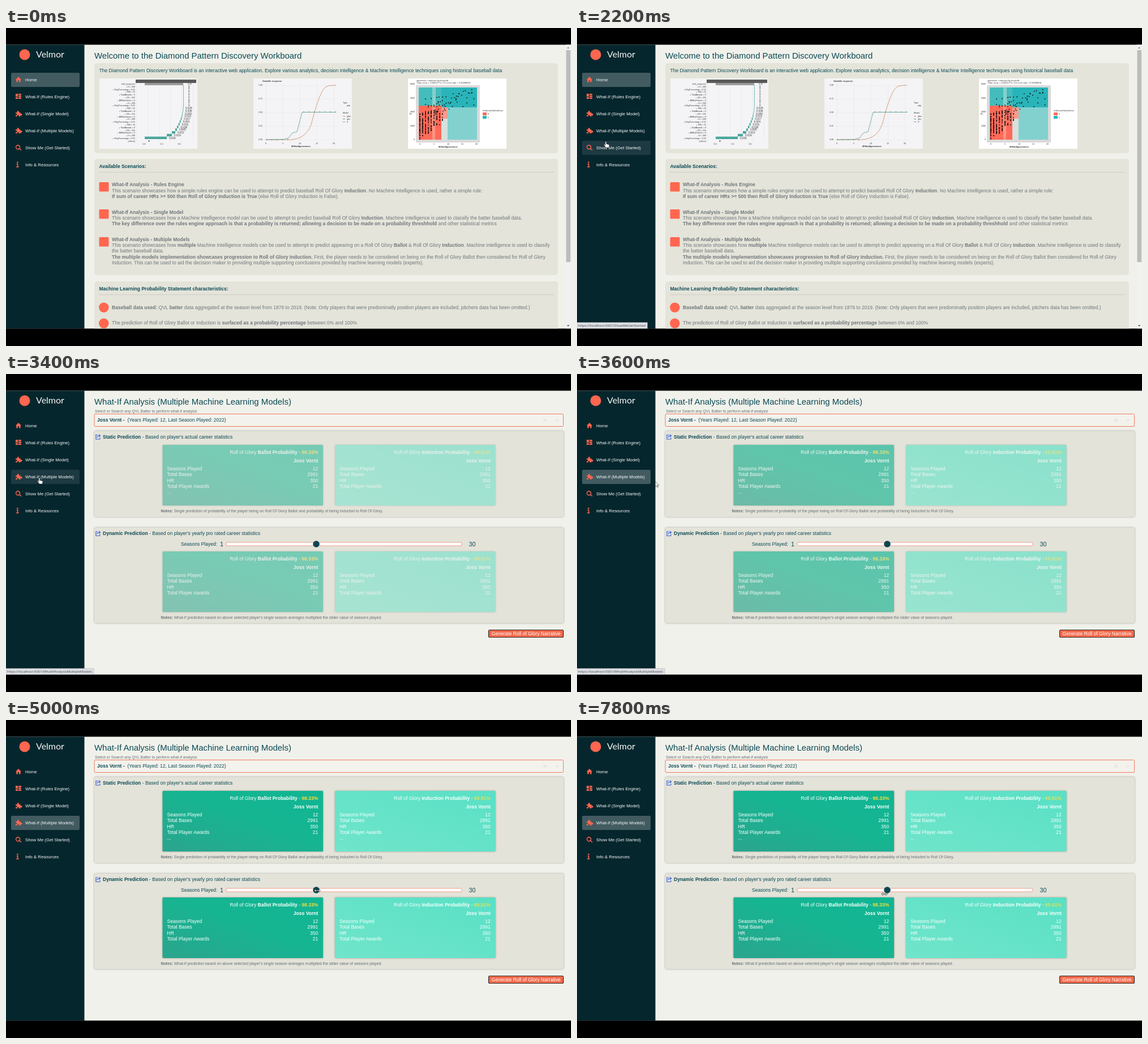
Recreate the animation shown at these times as an HTML page. Size 998 px wide and 561 px high, loop 8 s.

```html
<!DOCTYPE html>
<html lang="en">
<head>
<meta charset="utf-8">
<title>What-If Workboard</title>
<style>
  html, body { margin: 0; width: 100%; height: 100%; overflow: hidden; background: #000; }
  svg { display: block; width: 998px; height: 561px; font-family: "Liberation Sans", Arial, sans-serif; }
  text { white-space: pre; }
  .panel { filter: drop-shadow(0 0 1.5px #0005); }
</style>
</head>
<body>
<svg viewBox="0 0 998 561">
  <defs>
    <linearGradient id="strong" x1="0" y1="1" x2="1" y2="0">
      <stop offset="0" stop-color="#2ba58d"/><stop offset=".55" stop-color="#16b592"/><stop offset="1" stop-color="#10b592"/>
    </linearGradient>
    <linearGradient id="weak" x1="0" y1="1" x2="1" y2="0">
      <stop offset="0" stop-color="#70e5cb"/><stop offset="1" stop-color="#59e0c5"/>
    </linearGradient>
  </defs>
  <g id="stage"></g>
</svg>
<script>
const LOOP = 8000, STEP = 200;
const TOP = 29.5, BOTTOM = 530.5;
const ORANGE = '#ff6650', TEAL = '#0b4a55', GREY = '#70767a';
const PLAYER = 'Joss Vornt', HONOUR = 'Roll of Glory', HONOUR_CAP = 'Roll Of Glory';
const APP = 'Diamond Pattern Discovery Workboard';

// Drawing helpers; *stars* mark bold text
const text = (x, y, s, { size = 8.54, fill = TEAL, anchor = 'start', more = '' } = {}) =>
  `<text x="${x}" y="${y}" font-size="${size}" fill="${fill}" text-anchor="${anchor}" ${more}>${
    s.replace(/\*(.+?)\*/g, '<tspan font-weight="700">$1</tspan>')}</text>`;
const rect = (x, y, w, h, fill, more = '') =>
  `<rect x="${x}" y="${y}" width="${w}" height="${h}" fill="${fill}" ${more}/>`;
const circle = (x, y, r, fill) => `<circle cx="${x}" cy="${y}" r="${r}" fill="${fill}"/>`;
const path = (d, stroke, width = 1, fill = 'none') =>
  `<path d="${d}" stroke="${stroke}" stroke-width="${width}" fill="${fill}"/>`;
const at = (x, y, s) => `<g transform="translate(${x} ${y})">${s}</g>`;
const range = (n, f) => Array.from({ length: n }, (_, i) => f(i)).join('');

// Linear interpolation through [time, ...values] keys
function track(keys, t) {
  const i = keys.findIndex(k => k[0] > t);
  if (i < 0) return keys[keys.length - 1].slice(1);
  if (i === 0) return keys[0].slice(1);
  const a = keys[i - 1], b = keys[i], u = (t - a[0]) / (b[0] - a[0]);
  return a.slice(1).map((v, j) => v + (b[j + 1] - v) * u);
}

const POINTER = [
  [600, 44, 86], [1800, 51, 200], [2200, 51, 200], [2600, 59, 183], [3400, 59, 183],
  [4000, 297, 203], [5000, 550, 301], [5200, 550, 301], [6000, 580, 303],
  [6800, 582, 303], [7600, 557, 306], [7800, 543, 307]
];
const CARD_FADE = [[3000, .04], [3400, .52], [4000, .9], [4600, 1]];

// Sidebar
const PUZZLE = path('M0 3h3a1.7 1.7 0 1 1 2.6 0h3v2.6a1.7 1.7 0 1 1 0 2.2V10H5.5a1.5 1.5 0 1 0-2.4 0H0V7.6a1.5 1.5 0 1 0 0-2.4z', 'none', 0, ORANGE);
const MENU = [
  ['Home', '', path('M0 5L5 0l5 5H8.7v4.5H6.2V6.3H3.8v3.2H1.3V5z', 'none', 0, ORANGE)],
  ['What-If (Rules Engine)', 'WhatIfAnalysisRulesEngine',
    rect(0, 0, 4, 5, ORANGE) + rect(0, 6, 4, 3, ORANGE) + [0, 3.3, 6.6].map(y => rect(5, y, 5, 2.4, ORANGE)).join('')],
  ['What-If (Single Model)', 'WhatIfAnalysisSingleModel', PUZZLE],
  ['What-If (Multiple Models)', 'WhatIfAnalysisMultipleModels', PUZZLE],
  ['Show Me (Get Started)', 'ShowMeGetStarted', path('M7.6 4.2a3.5 3.5 0 1 1-7 0a3.5 3.5 0 1 1 7 0M6.7 6.6L10 9.8', ORANGE, 1.4)],
  ['Info &amp; Resources', 'InfoResources', circle(3.4, 1, 1.3, ORANGE) + path('M1.6 4h2v5M1 9h4.6', ORANGE, 1.6)]
];
const menuY = i => 91 + 30 * i;

function sidebar(active, hover) {
  return rect(0, TOP, 138.5, BOTTOM - TOP, '#06262d') + circle(33, 47, 9.5, ORANGE) +
    text(53, 52.3, 'Velmor', { size: 16, fill: '#f4f6f6', more: 'font-family="Lato, sans-serif"' }) +
    MENU.map(([label, , icon], i) => {
      const y = menuY(i);
      const back = i === hover ? '#1d3941' : i === active ? '#425b61' : '';
      return (back && rect(9, y - 12, 121, 25, back, 'rx="2"')) + at(17, y - 5, icon) +
        text(34, y + 3, label, { size: 7.73, fill: '#f6f8f8' });
    }).join('');
}

function status(item) {
  const url = 'https://localhost:5001/' + MENU[item][1];
  return rect(0, 519.5, 24 + url.length * 2.57, 11, '#dcdee2', 'stroke="#a9adb1" stroke-width=".5"') +
    text(2, 527.3, url, { size: 6.1, fill: '#454a50', more: 'font-family="Open Sans, sans-serif"' });
}

// Home page thumbnails
const tiny = (x, y, s, anchor = 'start', size = 3.6) => text(x, y, s, { size, fill: '#333', anchor });

function waterfall() {
  const labels = ['AllStarGames = 0', 'H = 200', 'SlugPercentage = 0.31', 'RBI = 55', 'TotalAwards = 0', 'GS = 101'];
  const edge = i => i < 9 ? 313 : i < 18 ? 313 - 14 * ((i - 8) / 9) ** 2 : [293, 284, 245][i - 18];
  return rect(165, 89, 173, 124, '#f4f4f6') + range(6, i => rect(230 + i * 20, 97, .4, 104, '#ddd')) +
    rect(229, 91, 107, 6, '#595959') + rect(245, 97, 68, 4, '#9b9b9b') +
    tiny(228, 100, 'total_prognosis', 'end') + tiny(328, 100, '0.50', 'end') +
    range(20, k => {
      const i = k + 1, y = 98 + i * 4.8, x = edge(i), end = edge(i - 1);
      const value = i < 9 ? '0' : '0.0' + (6 + i * 7 % 40);
      return tiny(228, y + 2, '+ ' + labels[i % 6], 'end') + rect(x, y - 2.4, Math.max(end - x, .8), 4.4, '#4ba69b') +
        tiny(i < 9 ? 322 : end + 4, y + 1.7, value, 'start', 4.6);
    }) +
    tiny(228, 201, '(others)', 'end') + circle(252.5, 199.5, 1, '#111') +
    ['0.0', '0.3', '0.6'].map((s, i) => tiny(244 + i * 31, 206, s, 'middle')).join('');
}

function responseChart() {
  return rect(437, 89, 174, 124, '#f4f3f5') + tiny(453, 94.5, '*Variable response*', 'start', 4) +
    range(5, i => rect(455, 101 + i * 24, 132, .5, '#e4e4e6') + rect(459 + i * 30, 97, .5, 104, '#e4e4e6') +
      tiny(453, 102 + i * 24, (1 - i / 4).toFixed(2), 'end') + tiny(459 + i * 30, 205, i * 5 + '', 'middle')) +
    path('M459 197H500C520 197 534 187 540 167C547 139 556 110 565 104Q569 101 583 101', '#c87a45', .7) +
    path('M459 197L490 196.5L499 194L506 185L514 183L523 149L529 148.5H583', '#3d9489', .7) +
    range(14, i => circle(460 + i * 9.4, i < 5 ? 197 : 148, i < 5 || i > 6 ? .8 : 0, '#3d8278')) +
    tiny(521, 210, '*AllStarAppearances*', 'middle') +
    tiny(595, 133, 'Type') + tiny(602, 138, 'pdp') + tiny(595, 151, 'Model') +
    ['#c87a45', '#3d9489', '#8b78b5'].map((c, i) => rect(595, 155 + i * 5, 4, .8, c) + tiny(602, 157 + i * 5, ['gbm', 'glm', 'rf'][i])).join('');
}

function scatter() {
  let seed = 7;
  const rnd = () => (seed = seed * 16807 % 2147483647) / 2147483647;
  const dot = (x, y) => circle(x.toFixed(1), y.toFixed(1), .95, '#111');
  return rect(710, 89, 174, 124, '#fff') +
    tiny(725, 94, 'agreement = induction by threshold') + tiny(725, 98, 'Train error = 0.0221771; CV error rate = 0.0186454', 'start', 4.2) +
    rect(724, 101, 113, 101, '#dadada') + rect(729, 105, 40, 32, '#44bcbc') + rect(753, 105, 6, 32, '#85d0cb') +
    rect(769, 105, 63, 35, '#29b4b9') + rect(729, 137, 40, 60, '#ff6a58') + rect(753, 137, 5, 60, '#ff9482') +
    rect(769, 140, 11, 20, '#ff9a8c') + rect(769, 160, 11, 37, '#d6e0dd') + rect(780, 140, 52, 57, '#82d1cf') +
    range(9, k => range(38 - 4 * k, () => dot(731 + k * 5, 196 - k * 3.5 - rnd() * (48 - 3 * k)))) +
    range(10, i => dot(741 + i % 5 * 5, 124 + rnd() * 16)) +
    range(52, () => { const u = rnd() ** 1.5; return dot(757 + u * 70, 152 - u * 14 - rnd() * 31); }) +
    range(5, i => tiny(722, 198 - i * 24.5, i * 2000 + '', 'end') + tiny(731 + i * 25, 206, i * 5 + '', 'middle')) +
    tiny(781, 210.5, '*AllStarAppearances*', 'middle') + tiny(712, 153, 'TB') +
    tiny(842, 147, 'inducted:false/true', 'start', 4.4) +
    rect(842, 149, 7, 5, '#ff6a58') + rect(842, 155, 7, 5, '#29b4b9') + tiny(851, 153, '0') + tiny(851, 159, '1');
}

// Home page
const block = (x, y, lines) => lines.map(([dy, s]) => text(x, y + dy, s, { fill: GREY })).join('');

const HOME = (() => {
  const ml = 'Machine Intelligence';
  const section = (y, h, title) => rect(156, y, 819, h, '#e4e4da', 'rx="5"') +
    text(164.5, y + 16, `*${title}*`) + rect(164, y + 23, 804, .8, '#c9cac3');
  return text(156, 54, `Welcome to the ${APP}`, { size: 14.95 }) +
    rect(156, 62, 819, 159, '#e4e4da', 'rx="5"') +
    text(164.5, 78, `The ${APP} is an interactive web application. Explore various analytics, decision intelligence &amp; ${ml} techniques using historical baseball data`) +
    waterfall() + responseChart() + scatter() +
    section(231, 205, 'Available Scenarios:') +
    [272, 320, 369].map(y => rect(164.5, y, 17, 16.5, ORANGE, 'rx="1.5"')).join('') +
    block(187, 279.3, [
      [0, '*What-If Analysis - Rules Engine*'],
      [10.2, `This scenario showcases how a simple rules engine can be used to attempt to predict baseball ${HONOUR_CAP} *Induction*. No ${ml} is used, rather a simple rule:`],
      [20.4, `*If sum of career HRs &gt;= 500 then ${HONOUR} Induction is True* (else ${HONOUR} Induction is False).`]]) +
    block(187, 327.6, [
      [0, '*What-If Analysis - Single Model*'],
      [10.2, `This scenario showcases how a ${ml} model can be used to attempt to predict baseball ${HONOUR_CAP} *Induction*. ${ml} is used to classify the batter baseball data.`],
      [20.6, '*The key difference over the rules engine approach is that a probability is returned; allowing a decision to be made on a probability threshhold* and other statistical metrics']]) +
    block(187, 376, [
      [0, '*What-If Analysis - Multiple Models*'],
      [10.2, `This scenario showcases how *multiple* ${ml} models can be used to attempt to predict appearing on a ${HONOUR_CAP} *Ballot* &amp; ${HONOUR_CAP} *Induction*. ${ml} is used to classify`],
      [20.4, 'the batter baseball data.'],
      [30.6, `*The multiple models implementation showcases progression to ${HONOUR} Induction.* First, the player needs to be considered on being on the ${HONOUR} Ballot then considered for ${HONOUR}`],
      [40.9, 'Induction. This can be used to aid the decision maker in providing multiple supporting conclusions provided by machine learning models (experts).']]) +
    section(447, 100, 'Machine Learning Probability Statement characteristics:') +
    circle(172.8, 493, 8.7, ORANGE) + circle(172.8, 521, 8.7, ORANGE) +
    block(187, 495.6, [
      [0, '*Baseball data used:* QVL *batter* data aggregated at the season level from 1876 to 2019. (Note: Only players that were predominatly position players are included, pitchers data has been omitted.)'],
      [27.4, `The prediction of ${HONOUR} Ballot or Induction is *surfaced as a probability percentage* between 0% and 100%`]]) +
    rect(989, TOP, 9, BOTTOM - TOP, '#f1f1f1') + rect(989.5, 39, 7.5, 374, '#bcbcbc') +
    path('M991 36l2-2.5l2 2.5z', 'none', 0, '#777') + path('M991 524l2 2.5l2-2.5z', 'none', 0, '#444');
})();

// Prediction page
const CHANCES = { 12: [98.33, 69.81], 13: [97.94, 86.47], 14: [97.49, 94.2] };
const thumbX = seasons => 394 + 14 * (seasons - 1);

function card(x, y, kind, chance, seasons, tail = '') {
  const strong = chance > 75, white = { fill: '#f7fffc' }, right = { ...white, anchor: 'end' };
  const rows = [['Seasons Played', 12], ['Total Bases', 2991], ['HR', 350], ['Total Player Awards', 21]];
  const colour = strong ? '#f4dc3a' : '#dce05a';
  return rect(x, y, 283.5, 107, `url(#${strong ? 'strong' : 'weak'})`, 'rx="1.5" class="panel"') +
    text(x + 274.8, y + 16, `${HONOUR} *${kind} Probability* - <tspan font-weight="700" fill="${colour}">${chance.toFixed(2)}%</tspan>`, right) +
    text(x + 274.8, y + 30.7, `*${PLAYER}*`, right) +
    rows.map(([label, total], i) => text(x + 8, y + 45 + i * 10.3, label, white) +
      text(x + 274.8, y + 45 + i * 10.3, Math.round(total / 12 * seasons) + '', right)).join('') +
    text(x + 8, y + 86, tail, white);
}

function cards(y, seasons, tail) {
  const [ballot, induction] = CHANCES[seasons];
  return card(276.5, y, 'Ballot', ballot, seasons, tail) + card(581, y, 'Induction', induction, seasons, tail);
}

function prediction(t, seasons) {
  const panel = (y, h, title) => rect(156, y, 829, h, '#e4e3d9', 'rx="3" class="panel"') +
    at(158, y + 5.5, path('M4 1.5H.8v7.5h7V6M2.8 6.2Q3 3 8 2.8M6 .6L8.6 2.8L6 5', '#3a62d8', 1.1)) +
    text(171, y + 13, title);
  const note = { size: 6.84, fill: '#667074' };
  return text(156, 54, 'What-If Analysis (Multiple Machine Learning Models)', { size: 14.95 }) +
    text(157, 68, 'Select or Search any QVL Batter to perform what-if analysis', note) +
    rect(156, 70.5, 828.5, 22, '#f3f2ec', 'rx="2" stroke="#f0785c"') +
    text(161, 84, `*${PLAYER} -*  (Years Played: 12, Last Season Played: 2022)`) +
    path('M949.5 79l5 5m0-5l-5 5M970 80l3 3l3-3', '#d6d6d0', 1) +
    panel(100.5, 151.5, "*Static Prediction* - Based on player's actual career statistics") +
    text(273.5, 243.6, `*Notes:* Single prediction of probability of the player being on ${HONOUR_CAP} Ballot and probability of being Inducted to ${HONOUR_CAP}.`, note) +
    panel(271, 168.5, "*Dynamic Prediction* - Based on player's yearly pro rated career statistics") +
    text(273.5, 431.6, "*Notes:* What-If prediction based on above selected player's single season averages multiplied the slider value of seasons played.", note) +
    text(309, 303, 'Seasons Played:') + text(378, 303.5, '1', { size: 10.8 }) + text(817.5, 303.5, '30', { size: 10.8 }) +
    rect(389, 297, 416, 6, '#fff', 'rx="2" stroke="#ef8a72" stroke-width=".8"') +
    circle(thumbX(seasons), 300, 5.8, '#0c4651') +
    `<g opacity="${track(CARD_FADE, t)[0]}">${cards(125, 12, '...') + cards(313, seasons, '')}</g>` +
    rect(852.5, 451.5, 132, 13, '#f4694a', 'rx="2" stroke="#2d2d2d" stroke-width="1.2"') +
    text(918.5, 461, `Generate ${HONOUR} Narrative`, { fill: '#fff', anchor: 'middle' });
}

const HAND = path('M-1 1Q0-1 1 1V4.5L5 5.5Q6.3 6 6 7.5L5 11H0L-3 7Q-3-0 -1 7z', '#222', .6, '#fff');
const ARROW = path('M0 0V9L2.1 7.1L3.5 10.3L5 9.6L3.6 6.5H6.4z', '#222', .6, '#fff');
const RESIZE = path('M-5.5 0L-2.8-2.4V-.8H2.8V-2.4L5.5 0L2.8 2.4V.8H-2.8V2.4z', '#222', .7, '#fff');

function render(t) {
  const [x, y] = track(POINTER, t), shown = t >= 600, home = t < 3000;
  const item = Math.round((y - 91) / 30);
  const over = shown && x < 130 && Math.abs(y - menuY(item)) < 13;
  const sliding = t >= 5000;
  const seasons = t < 5400 ? 12 : Math.round((x - 394) / 14 + 1);
  return rect(0, TOP, 998, BOTTOM - TOP, '#f1f1eb') +
    (home ? HOME : prediction(t, seasons)) + sidebar(home ? 0 : 3, over ? item : -1) +
    (shown && t < 4400 ? status(t < 3400 ? item : 3) : '') +
    rect(0, BOTTOM, 998, 561 - BOTTOM, '#000') +
    (shown ? at(x, y, over ? HAND : sliding ? RESIZE : ARROW) : '');
}

const stage = document.getElementById('stage');
const start = performance.now();
let last = -1;
function tick() {
  const t = Math.floor((performance.now() - start) % LOOP / STEP) * STEP;
  if (t !== last) stage.innerHTML = render(last = t);
  requestAnimationFrame(tick);
}
tick();
</script>
</body>
</html>
```
